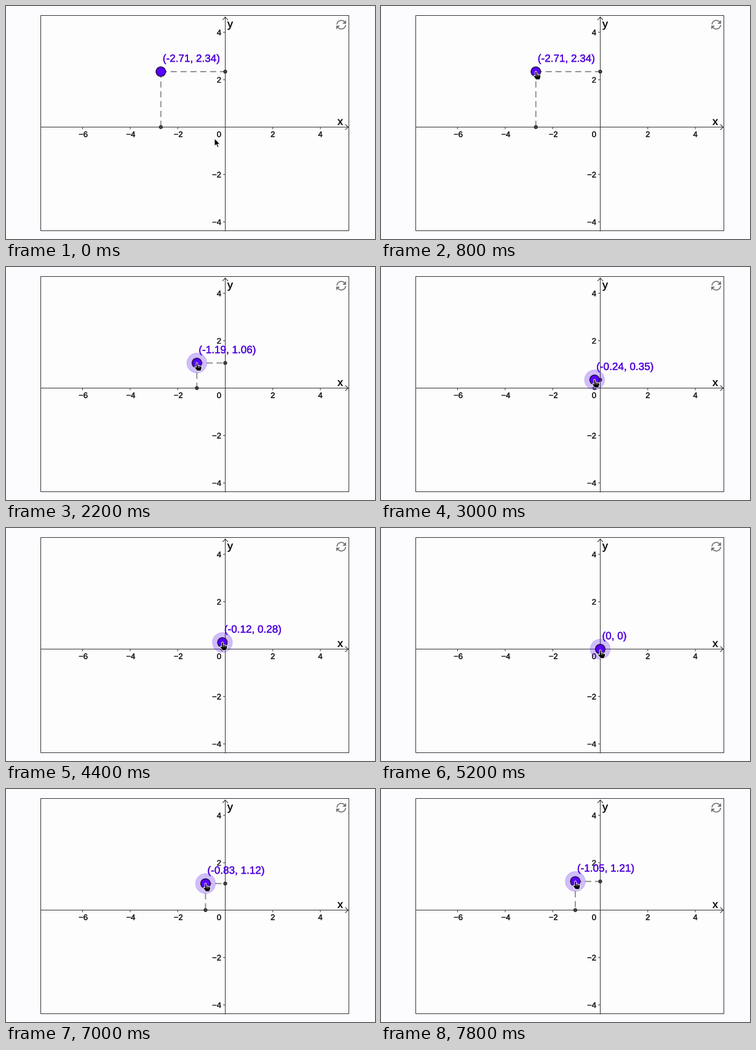
A matplotlib script that plays this animation: 600 px wide and 380 px high, repeating every 8 s.

```python
import numpy as np
import matplotlib.pyplot as plt
from matplotlib.animation import FuncAnimation
from matplotlib.patches import Circle, Polygon, Rectangle
from matplotlib.patheffects import withStroke

W, H, DPI = 600, 380, 100
PT = 72 / DPI
STEP, LOOP = 200, 8000
OX, OY, UNIT = 356.5, 197.5, 38.65
INK, VIOLET, TEXT, DASH = "#333333", "#5a00ff", "#5208dc", "#949494"
FONT = "Liberation Sans"

HOVER, GRAB = 800, 1000
SNAPS, REACH = [(-2, 2), (0, 0)], 0.3

# where the pointer drags to: ms, x, y in axis units
PATH = [(GRAB, -2.71, 2.34), (1400, -2.15, 1.77), (3000, -0.24, 0.35),
        (3400, 0, -0.05), (4000, 0, -0.05), (4400, -0.12, 0.28),
        (4800, -0.57, 0.48), (5200, 0, -0.05), (6000, -0.62, 0.71),
        (7000, -0.83, 1.12), (7800, -1.05, 1.21)]
REST = np.array([339, 216])

ARROW = np.array([(0, 0), (0, 12.5), (2.9, 9.9), (5, 14.6), (7, 13.7),
                  (5, 9.2), (9, 9.2)])
HAND = np.array([(-1.3, 0), (0, -1), (1.3, 0), (1.6, 4), (4, 4), (7.8, 6),
                 (7.8, 9), (6.4, 13), (0.2, 13), (-4, 7.2), (-3, 6),
                 (-0.9, 7.2)])


def px(p):
    return np.array([OX + p[0] * UNIT, OY - p[1] * UNIT])


def dragged(t):
    ts, xs, ys = zip(*PATH)
    return np.interp(t, ts, xs), np.interp(t, ts, ys)


def snapped(p):
    for s in SNAPS:
        if np.hypot(p[0] - s[0], p[1] - s[1]) < REACH:
            return s
    return p


def smooth(u):
    u = min(max(u, 0), 1)
    return u * u * (3 - 2 * u)


def number(v):
    return f"{round(float(v), 2) + 0.0:g}"


fig = plt.figure(figsize=(W / DPI, H / DPI), dpi=DPI, facecolor="#fcfbfd")
ax = fig.add_axes([0, 0, 1, 1])
ax.set(xlim=(0, W), ylim=(H, 0))
ax.axis("off")


def line(xs, ys, color=INK, width=1.0, **kw):
    return ax.plot(xs, ys, color=color, lw=width * PT, snap=False, **kw)[0]


def label(x, y, s, size, ha="center", color="#222222", **kw):
    weight = [withStroke(linewidth=0.3, foreground=color)]
    return ax.text(x, y, s, size=size * PT, family=FONT, color=color, ha=ha,
                   va="baseline", path_effects=weight, **kw)


def draw_axes():
    ax.add_patch(Rectangle((56.5, 15.5), 501, 351, fc="#fefdfe", ec=INK,
                           lw=PT, snap=False))
    line([57, 557], [OY, OY])
    line([OX, OX], [18, 367])
    line([552, 556.5, 552], [OY - 4, OY, OY + 4], width=1.1)
    line([OX - 4, OX, OX + 4], [22.5, 18, 22.5], width=1.1)
    for n in (-6, -4, -2, 2, 4):
        x, y = px((n, n))
        s = str(n).replace("-", "\u2212")
        line([x, x], [OY, OY + 3])
        label(x + (1 if n < 0 else 0), 213.7, s, 13)
        if n > -6:
            line([OX - 3, OX], [y, y])
            label(350, y + 4.8, s, 13, "right")
    label(350, 213.7, "0", 13, "right")
    label(543.5, 194, "x", 17.5, color="#111111")
    label(364.5, 35, "y", 17.5, color="#111111")


def draw_reload(cx=545.2, cy=30.5, r=7):
    barb = np.array([(7.8, -7.2), (7.8, -1.2), (1.8, -1.2)])
    for s in (1, -1):
        a = np.radians(np.linspace(190, 315, 30))
        line(cx + s * r * np.cos(a), cy + s * r * np.sin(a), "#777777", 1.7)
        ax.add_patch(Polygon(barb * s + (cx, cy), fc="#777777", ec="none"))


draw_axes()
draw_reload()

dashes = (0, (5, 3))
drop_x = line([], [], DASH, 2, ls=dashes, zorder=3)
drop_y = line([], [], DASH, 2, ls=dashes, zorder=3)
feet = [ax.add_patch(Circle((0, 0), 2.6, fc="#444444", ec="#1c1c1c", lw=PT,
                            zorder=4)) for _ in range(2)]
halo = ax.add_patch(Circle((0, 0), 16.2, fc=(0.35, 0.1, 0.97, 0.28),
                           ec=(0.35, 0.1, 0.85, 0.2), lw=PT, zorder=5))
dot = ax.add_patch(Circle((0, 0), 7.8, fc=VIOLET, ec="#15102a", lw=0.95,
                          zorder=6))
coords = label(0, 0, "", 17.1, "left", TEXT, zorder=7)
cursor = ax.add_patch(Polygon(ARROW, fc="black", ec="white", lw=0.65,
                              zorder=8))
knuckles = [line([], [], "white", 0.7, zorder=9) for _ in range(2)]


def update(i):
    t = i * STEP
    grabbed, hand = t >= GRAB, t >= HOVER
    aim = dragged(t)
    p = snapped(aim)
    x, y = px(p)

    drop_x.set_data([x, x], [y, OY])
    drop_y.set_data([x, OX], [y, y])
    feet[0].center = x, OY
    feet[1].center = OX, y
    dot.center = halo.center = x, y
    halo.set_visible(grabbed)
    coords.set_position((x + 3, y - 16))
    coords.set_text(f"({number(p[0])}, {number(p[1])})")

    tip = REST + (px(aim) - REST) * smooth(t / HOVER)
    cursor.set_xy((HAND if hand else ARROW) + tip)
    for k, mark in enumerate(knuckles):
        mx = tip[0] + 2 + 2.4 * k
        mark.set_data([mx, mx], [tip[1] + 4.5 + 0.6 * k, tip[1] + 7.5])
        mark.set_visible(hand)
    return drop_x, drop_y, *feet, halo, dot, coords, cursor, *knuckles


anim = FuncAnimation(fig, update, frames=LOOP // STEP, interval=STEP,
                     repeat=True, repeat_delay=0, blit=False)
plt.show()
```
